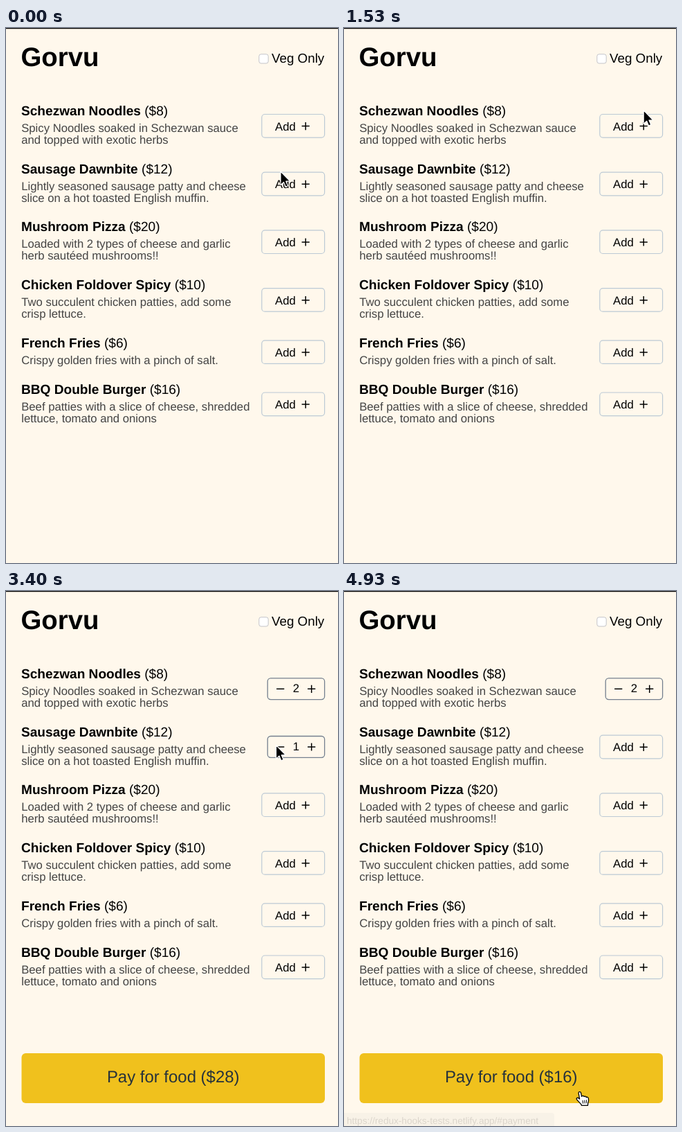
These frames come from a looping animation (480x772 px, 5.01 s). An HTML page:

```html
<!DOCTYPE html>
<html lang="en">
<head>
<meta charset="utf-8">
<title>Food menu</title>
<style>
  html, body { margin: 0; width: 100%; height: 100%; overflow: hidden; background: #fff8ec; }
  svg { display: block; width: 100%; height: 100%; }
  text { font-family: "Liberation Sans", Helvetica, Arial, sans-serif; text-rendering: geometricPrecision; white-space: pre; }
  .logo { font-size: 38.4px; font-weight: bold; }
  .veg { font-size: 18.8px; }
  .name { font-size: 19.1px; }
  .name tspan { font-weight: bold; }
  .desc { font-size: 16.7px; fill: #444; }
  .label { font-size: 16.7px; }
  .pay { font-size: 23.95px; fill: #26323b; text-anchor: middle; }
  .count { text-anchor: middle; }
  .add { fill: none; stroke: #bccad5; stroke-width: 1.2; }
  .stepper { fill: none; stroke: #75808f; stroke-width: 1.3; }
  .sign { fill: none; stroke: #000; stroke-width: 1.5; }
</style>
</head>
<body>
<svg viewBox="0 0 480 772">
  <rect width="480" height="772" fill="#fff8ec"/>
  <rect width="480" height="1.2" fill="#000"/>
  <text class="logo" x="21.5" y="55.2">Gorvu</text>
  <text class="veg" x="384" y="50.3">Veg Only</text>
  <g id="page"></g>
  <g id="status" opacity="0">
    <path d="M0 753H300a4 4 0 0 1 4 4V772H0Z" fill="#e2dfda"/>
    <text x="4" y="769" font-size="13.6" fill="#66635f">https://redux-hooks-tests.netlify.app/#payment</text>
  </g>
  <path id="arrow" d="M0 0V19.6L4.5 15.5L7.4 22.2L10.6 20.8L7.8 14.2H13.8Z" fill="#000" stroke="#fff" stroke-width="1.2" stroke-linejoin="round"/>
  <g id="hand" fill="#fff" stroke="#000" stroke-width="1.3" stroke-linejoin="round" stroke-linecap="round">
    <path d="M-1.9 1.6C-2.1 -.6 1 -1 1.5 1.2L2.7 6.5C3.6 5.2 5.6 5.4 6 6.9C7 5.9 8.8 6.2 9.2 7.8C10.6 7 12.2 7.8 12.4 9.4C12.8 12 13.2 14.2 11.8 16.4L11.4 19.6H2.4L1.9 17.9C-.2 15.6 -2.6 13.2 -4.6 10.8C-5.5 9.2 -3.6 7.8 -2.2 8.8L-.4 10.2Z"/>
    <path d="M4 12.6L4.6 16.4M6.8 12.3L7.2 16.2M9.5 12L9.8 16" stroke-width="1"/>
  </g>
</svg>
<script>
const LOOP = 5010;
const $ = id => document.getElementById(id);

const menu = [
  { name: "Schezwan Noodles", price: 8, veg: true, desc: ["Spicy Noodles soaked in Schezwan sauce", "and topped with exotic herbs"] },
  { name: "Sausage Dawnbite", price: 12, desc: ["Lightly seasoned sausage patty and cheese", "slice on a hot toasted English muffin."] },
  { name: "Mushroom Pizza", price: 20, veg: true, desc: ["Loaded with 2 types of cheese and garlic", "herb sautéed mushrooms!!"] },
  { name: "Chicken Foldover Spicy", price: 10, desc: ["Two succulent chicken patties, add some", "crisp lettuce."] },
  { name: "French Fries", price: 6, veg: true, desc: ["Crispy golden fries with a pinch of salt."] },
  { name: "BBQ Double Burger", price: 16, desc: ["Beef patties with a slice of cheese, shredded", "lettuce, tomato and onions"] }
];

// Clicks: time, veg filter, quantities of the first two dishes
const steps = [
  [0, false, 0, 0], [800, true, 0, 0], [1270, false, 0, 0], [1740, false, 1, 0],
  [2080, false, 2, 0], [2760, false, 2, 1], [3560, false, 2, 0]
];

// Pointer: time, x, y
const pointer = [
  [0, 397, 207], [300, 391, 110], [580, 378, 34], [750, 376, 43], [1070, 377.5, 44.5], [1300, 378, 45],
  [1620, 446, 136], [1740, 440, 143], [1930, 435, 146], [2180, 436, 146], [2530, 425, 212.5],
  [2720, 420, 222], [2950, 419, 223], [3400, 390.5, 222.5], [3640, 390, 223], [4060, 347, 705],
  [4120, 345.5, 714.5], [4260, 344, 723], [4930, 341, 722.8], [LOOP, 341, 722.8]
];

const fade = [[0, 0], [4340, 0], [4460, 1], [4760, 1], [4955, 0.12], [LOOP, 0]];

function sample(keys, t, ease = p => p) {
  const i = Math.max(1, keys.findIndex(k => k[0] > t));
  const a = keys[i - 1], b = keys[i];
  const p = ease((t - a[0]) / (b[0] - a[0]));
  return a.slice(1).map((v, n) => v + (b[n + 1] - v) * p);
}
const smooth = p => p * p * (3 - 2 * p);

const text = (cls, x, y, body) => `<text class="${cls}" x="${x}" y="${y}">${body}</text>`;
const box = (cls, x, y, w, h) => `<rect class="${cls}" x="${x}" y="${y}" width="${w}" height="${h}" rx="4.5"/>`;
const minus = (x, y) => `<path class="sign" d="M${x - 5.6} ${y}h11.2"/>`;
const plus = (x, y) => `<path class="sign" d="M${x - 5.6} ${y}h11.2M${x} ${y - 5.6}v11.2"/>`;

function control(y, count) {
  if (!count) return box("add", 369.8, y - 16.9, 90.8, 33.6) + text("label", 389, y + 6.3, "Add") + plus(433.2, y + .2);
  return box("stepper", 378.2, y - 15.6, 82.4, 30.8) + minus(396.7, y - .1) +
    text("label count", 419.5, y + 5, count) + plus(441.7, y - .1);
}

function checkbox(on) {
  const fill = on ? "#77767b" : "#fff", edge = on ? "#77767b" : "#c3c4c8";
  return `<rect x="365.8" y="37.8" width="13.4" height="13.2" rx="3" fill="${fill}" stroke="${edge}"/>` +
    (on ? '<path d="M369 44.8l2.5 2.9L376 41" fill="none" stroke="#fff" stroke-width="1.7"/>' : "");
}

function page([, vegOnly, ...counts]) {
  let y = 126, total = 0, out = checkbox(vegOnly);
  menu.forEach((dish, i) => {
    const count = counts[i] || 0, lines = dish.desc.length;
    total += count * dish.price;
    if (vegOnly && !dish.veg) return;
    out += text("name", 22, y, `<tspan>${dish.name}</tspan> ($${dish.price})`);
    dish.desc.forEach((line, n) => out += text("desc", 22.2, y + 24 + n * 17, line));
    out += control(y + (lines > 1 ? 15.4 : 6.9), count);
    y += 49.7 + lines * 17;
  });
  if (total) {
    out += '<rect x="22.5" y="667" width="438.5" height="72" rx="6" fill="#f0c11d"/>' +
      text("pay", 241.7, 709.4, `Pay for food ($${total})`);
  }
  return out;
}

let shown;
function draw(now) {
  const t = now % LOOP;
  const step = steps.filter(s => s[0] <= t).pop();
  if (step !== shown) {
    $("page").innerHTML = page(step);
    shown = step;
  }
  const [x, y] = sample(pointer, t, smooth);
  const overPay = y > 667;
  for (const [id, on] of [["arrow", !overPay], ["hand", overPay]]) {
    $(id).setAttribute("transform", `translate(${x} ${y})`);
    $(id).setAttribute("visibility", on ? "visible" : "hidden");
  }
  $("status").setAttribute("opacity", sample(fade, t)[0]);
}

const start = performance.now();
function tick() {
  draw(performance.now() - start);
  requestAnimationFrame(tick);
}
tick();
</script>
</body>
</html>
```
